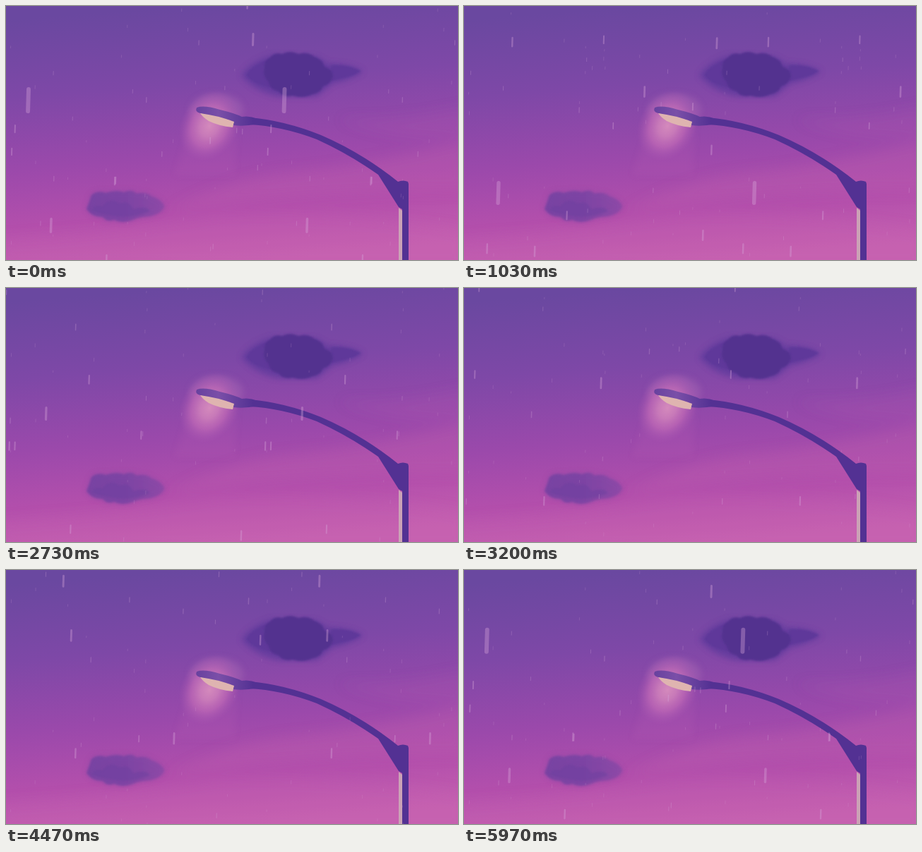
An HTML page with a canvas for the animation above (6010 ms loop, 640 by 360 pixels).

```html
<!DOCTYPE html>
<html lang="en">
<head>
<meta charset="utf-8">
<title>Street lamp in the rain</title>
<style>
  html, body { margin: 0; width: 100%; height: 100%; overflow: hidden; background: #8a49a8; }
  svg, canvas { position: absolute; left: 0; top: 0; width: 640px; height: 360px; display: block; }
</style>
</head>
<body>
<svg viewBox="0 0 640 360">
  <defs>
    <linearGradient id="sky" gradientUnits="userSpaceOnUse" x1="306" y1="-4" x2="334" y2="362">
      <stop offset="0" stop-color="#6a48a0"/>
      <stop offset=".3" stop-color="#7e48a7"/>
      <stop offset=".58" stop-color="#9b49ab"/>
      <stop offset=".8" stop-color="#b34fac"/>
      <stop offset="1" stop-color="#c661b0"/>
    </linearGradient>
    <radialGradient id="halo">
      <stop offset="0" stop-color="#d48abc"/>
      <stop offset=".3" stop-color="#cd7fba" stop-opacity=".9"/>
      <stop offset=".6" stop-color="#c06ab6" stop-opacity=".7"/>
      <stop offset="1" stop-color="#a757b0" stop-opacity="0"/>
    </radialGradient>
    <linearGradient id="head" gradientUnits="userSpaceOnUse" x1="268" y1="0" x2="350" y2="0">
      <stop offset="0" stop-color="#67419e"/>
      <stop offset=".4" stop-color="#7a4fa8"/>
      <stop offset="1" stop-color="#533193"/>
    </linearGradient>
    <linearGradient id="puff">
      <stop offset="0" stop-color="#7041a0"/>
      <stop offset=".5" stop-color="#7643a2"/>
      <stop offset="1" stop-color="#8a48a6"/>
    </linearGradient>
    <filter id="edge" x="-20%" y="-30%" width="140%" height="160%"><feGaussianBlur stdDeviation="1.4"/></filter>
    <filter id="soft" x="-30%" y="-50%" width="160%" height="200%"><feGaussianBlur stdDeviation="4"/></filter>
    <filter id="wide" x="-30%" y="-60%" width="160%" height="220%"><feGaussianBlur stdDeviation="9"/></filter>
    <path id="cloudlet" d="M114 288Q118 278 121 268Q130 261 141 265Q156 260 167 264Q178 259 185 266Q198 263 206 270Q222 275 224 285Q219 295 203 298Q187 299 180 303Q165 309 153 303Q143 307 137 299Q123 300 114 288Z"/>
  </defs>

  <rect width="640" height="360" fill="url(#sky)"/>
  <g filter="url(#wide)" fill="#c766b1">
    <path d="M650 190Q530 224 400 236Q310 246 230 292Q400 262 650 262Z" opacity=".24"/>
    <path d="M650 142Q560 164 470 160Q540 190 650 188Z" opacity=".12"/>
    <path d="M-10 330Q150 322 300 296Q480 290 650 318V370H-10Z" opacity=".22"/>
  </g>

  <path d="M333 98Q345 80 375 70L440 72L456 82Q482 80 506 93Q490 104 462 110L440 128H385Q350 120 333 98Z" fill="#613a9c" opacity=".85" filter="url(#soft)"/>
  <path d="M460 84Q484 82 503 92Q490 101 460 106ZM378 74Q348 82 340 98Q350 112 378 116Z" fill="#5e389a" filter="url(#edge)"/>
  <path d="M366 88Q364 78 374 73Q380 65 391 68Q402 62 414 68Q427 64 437 72Q449 76 451 86Q464 90 463 100Q460 111 449 114Q446 123 434 125Q421 132 406 127Q392 130 386 121Q374 119 372 108Q362 98 366 88Z" fill="#53308f" filter="url(#edge)"/>

  <use href="#cloudlet" fill="#8748a5" opacity=".6" filter="url(#soft)"/>
  <use href="#cloudlet" fill="url(#puff)" opacity=".8" filter="url(#edge)"/>
  <path d="M121 290Q126 280 136 284Q148 270 160 280Q174 274 180 288Q198 282 204 291Q178 301 156 298Q140 296 121 290Z" fill="#6c3f9e" opacity=".5" filter="url(#edge)"/>

  <path d="M262 160L238 240H324L328 165Z" fill="#b85fb4" opacity=".16" filter="url(#soft)"/>
  <ellipse cx="298" cy="148" rx="38" ry="24" fill="#a566b4" opacity=".5" filter="url(#soft)"/>
  <ellipse cx="288" cy="170" rx="41" ry="52" fill="url(#halo)" transform="rotate(28 288 170)"/>

  <path d="M344 158Q394 162 446 183Q504 208 555 249Q562 246 569 249L570 252V360H561V288L556 285L527 239Q486 210 440 189Q390 170 344 168Z" fill="#533193"/>
  <path d="M270 144Q280 140 303 147Q324 152 334 157Q345 155 356 160V167Q338 171 322 169L318 162Q296 158 275 152Q267 150 270 144Z" fill="url(#head)"/>
  <path d="M275 152Q299 155 323 164L321 172Q301 170 287 163Q279 158 275 152Z" fill="#dfb4b0"/>
  <path d="M556 286L561 290V360H556Z" fill="#cba2b6"/>
</svg>
<canvas id="rain" width="640" height="360"></canvas>

<script>
const LOOP = 6010, STEPS = 180, TILE = 362.5, SLANT = 0.025;
const ctx = document.getElementById('rain').getContext('2d');

// The nearest, largest drops: where each stands (x, top) at one step.
const drops = [
  { at: 0, x: 32, y: 115, len: 37 },
  { at: 0, x: 64, y: 300, len: 22 },
  { at: 0, x: 350, y: 38, len: 19 },
  { at: 31, x: 49, y: 248, len: 34 },
  { at: 59, x: 71, y: 252, len: 17 },
  { at: 82, x: 57, y: 168, len: 20 },
  { at: 112, x: 51, y: 38, len: 34 },
  { at: 155, x: 73, y: 347, len: 18 }
];

let seed = 41;
const rand = (min, max) => {
  seed = (seed * 16807) % 2147483647;
  return min + (max - min) * seed / 2147483647;
};

// Smaller, farther drops, mostly short.
for (let i = 0; i < 75; i++) {
  drops.push({
    at: rand(0, STEPS), x: rand(0, TILE), y: rand(0, 360), len: 6 + 12 * rand(0, 1) ** 1.5
  });
}
const mist = Array.from({ length: 26 }, () => ({
  x: rand(0, TILE), phase: rand(0, 1), laps: Math.floor(rand(1, 4)), len: rand(3, 6)
}));

function streak(x, y, len, alpha) {
  if (y > 360 || y + len < 0) return;
  const width = Math.max(1, len * 0.16);
  ctx.lineWidth = width;
  ctx.strokeStyle = `rgba(212,164,216,${alpha})`;
  for (const left of [x - TILE, x, x + TILE]) {
    ctx.beginPath();
    ctx.moveTo(left, y + width / 2);
    ctx.lineTo(left - len * SLANT, y + len - width / 2);
    ctx.stroke();
  }
}

function draw(step) {
  ctx.clearRect(0, 0, 640, 360);
  ctx.lineCap = 'round';
  for (const { x, phase, laps, len } of mist) {
    const y = (phase + laps * step / STEPS) % 1 * 380 - 10;
    streak(x, y, len, 0.2);
  }
  for (const { at, x, y, len } of drops) {
    const since = (step - at + STEPS * 1.5) % STEPS - STEPS / 2;
    const fall = since * len * 0.9;
    streak(x - fall * SLANT, y + fall, len, len < 10 ? 0.28 : 0.38);
  }
}

const start = performance.now();
function tick() {
  const t = (performance.now() - start) % LOOP;
  const step = Math.min(STEPS - 1, Math.floor((t + 5) * 0.03));
  draw(step < 2 ? 0 : step);
  requestAnimationFrame(tick);
}
tick();
</script>
</body>
</html>
```
